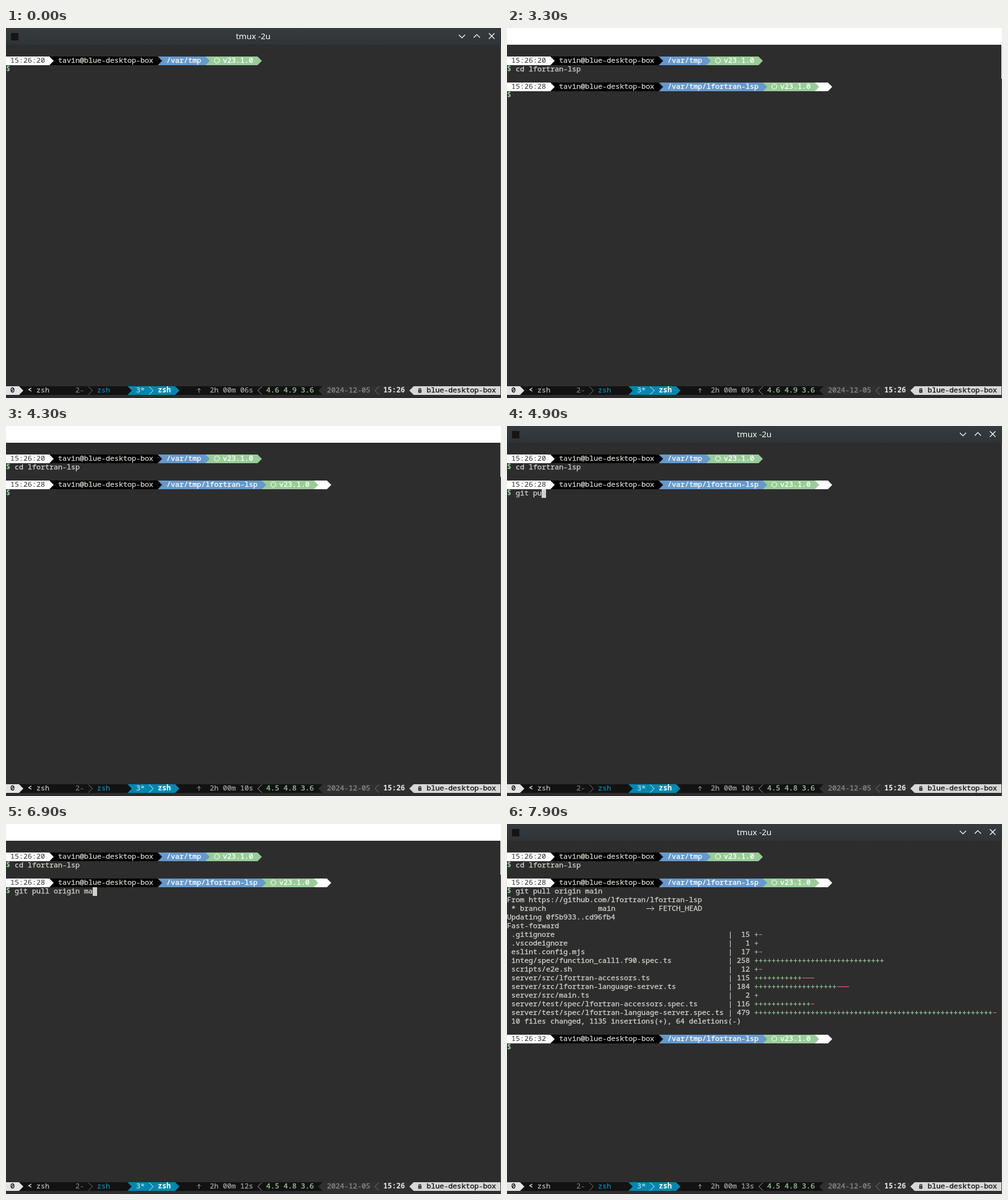
These frames come from a looping animation (799x597 px, 8 s). An HTML page:

```html
<!DOCTYPE html>
<html lang="en">
<head>
<meta charset="utf-8">
<title>Terminal</title>
<style>
html, body { margin: 0; width: 100%; height: 100%; overflow: hidden; background: #2d2d2d; }
svg { display: block; width: 799px; height: 597px; }
text { font: 400 11.667px "Noto Sans Mono", "DejaVu Sans Mono", monospace; white-space: pre; font-variant-ligatures: none; stroke-width: .3px; }
.b { font-weight: 600; stroke: none; }
.n { stroke: none; }
.title { font: 400 13.33px "Noto Sans", sans-serif; }
</style>
</head>
<body>
<svg id="stage" viewBox="0 0 799 597"></svg>
<script>
const LOOP = 8000, CW = 7, CH = 14;
const FG = '#d3d0c8', BG = '#2d2d2d', GREEN = '#99cc99', BLUE = '#6699cc', RED = '#f2676a';
const HOST = 'blue-desktop-box', USER = 'tavin';

const esc = s => s.replace(/&/g, '&amp;').replace(/</g, '&lt;').replace(/>/g, '&gt;');
// A hairline stroke gives the text its medium weight.
const text = (x, top, s, fill = FG, cls = '', id = '') =>
  `<text x="${x}" y="${top + 10}" fill="${fill}" stroke="${fill}" class="${cls}" id="${id}">${esc(s)}</text>`;
const rect = (x, y, w, h, fill) =>
  `<rect x="${x}" y="${y}" width="${w}" height="${h}" fill="${fill}"/>`;
const line = (d, color, w = 1) =>
  `<path d="${d}" fill="none" stroke="${color}" stroke-width="${w}"/>`;
const tip = (x, top, fill) => `<path d="M${x} ${top}l7 7l-7 7z" fill="${fill}"/>`;
const tipLeft = (x, top, fill) => `<path d="M${x + 7} ${top}l-7 7l7 7z" fill="${fill}"/>`;
const chevron = (x, top, color) => line(`M${x} ${top + .5}l6.5 6.5l-6.5 6.5`, color);
const chevronLeft = (x, top, color) => line(`M${x + 7} ${top + .5}l-6.5 6.5l6.5 6.5`, color);
const group = (id, body) => `<g id="${id}">${body}</g>`;

// Segmented prompt; each segment runs under the tip of the one before it.
function prompt(top, clock, path, inRepo) {
  const a = 259 + path.length * CW + CW, b = a + 84;
  const hx = a + 18.5, hy = top + 6.5;
  let s = inRepo ? rect(b, top, 21, CH, '#fff') + tip(b + 21, top, '#fff') : '';
  s += rect(a, top, 84, CH, GREEN) + tip(b, top, GREEN);
  s += rect(245, top, a - 245, CH, BLUE) + tip(a, top, BLUE);
  s += rect(70, top, 175, CH, '#000') + tip(245, top, '#000');
  s += rect(0, top, 70, CH, '#fff') + tip(70, top, '#fff');
  s += text(7, top, clock, '#2d2d2d', 'n');
  s += text(84, top, `${USER}@${HOST}`, FG);
  s += text(259, top, path, '#fff');
  s += line(`M${hx} ${hy - 4.3}l3.8 2.1v4.4l-3.8 2.1l-3.8 -2.1v-4.4z`, '#fff');
  s += text(a + 28, top, 'v23.1.0', '#fff');
  return s + text(0, top + CH, '$', GREEN, 'b');
}

// name, changed lines, plus signs, minus signs
const files = [
  ['.gitignore', 15, 1, 1],
  ['.vscodeignore', 1, 1, 0],
  ['eslint.config.mjs', 17, 1, 1],
  ['integ/spec/function_call1.f90.spec.ts', 258, 30, 0],
  ['scripts/e2e.sh', 12, 1, 1],
  ['server/src/lfortran-accessors.ts', 115, 11, 3],
  ['server/src/lfortran-language-server.ts', 184, 19, 3],
  ['server/src/main.ts', 2, 1, 0],
  ['server/test/spec/lfortran-accessors.spec.ts', 116, 13, 1],
  ['server/test/spec/lfortran-language-server.spec.ts', 479, 55, 1]
];

function pullOutput() {
  let s = text(0, 116, 'From https://github.com/lfortran/lfortran-lsp');
  s += text(7, 130, '* branch') + text(147, 130, 'main') + text(245, 130, 'FETCH_HEAD');
  s += line('M225 136.5h12M233.5 133l3.5 3.5l-3.5 3.5', FG);
  s += text(0, 144, 'Updating 0f5b933..cd96fb4') + text(0, 158, 'Fast-forward');
  files.forEach(([name, n, plus, minus], i) => {
    const top = 172 + i * CH, x = 399 + plus * CW;
    s += text(7, top, name) + text(357, top, '| ' + String(n).padStart(3));
    s += text(399, top, '+'.repeat(plus), GREEN);
    if (minus) s += line(`M${x + 1} ${top + 6.5}h${minus * CW - 2}`, RED);
  });
  return s + text(7, 312, '10 files changed, 1135 insertions(+), 64 deletions(-)');
}

function titleBar() {
  return rect(0, 0, 799, 27, 'url(#bar)') + rect(8, 8, 12, 12, '#171413') +
    '<text x="399" y="18" text-anchor="middle" fill="#fcfcfc" class="title">tmux -2u</text>' +
    line('M731 11l5 5l5 -5M755 15.5l5 -5l5 5M779.5 8.5l9 9M788.5 8.5l-9 9', '#fcfcfc', 1.2);
}

function statusBar() {
  const y = 578, dark = '#121212', teal = '#0087af', mid = '#303030', pale = '#d7d7d7', grey = '#9e9e9e';
  const light = '#e4e4e4';
  let s = rect(0, y, 511, CH, dark) + rect(511, y, 140, CH, mid);
  s += rect(0, y, 21, CH, light) + tip(21, y, light) + text(7, y, '0', dark);
  s += text(35, y, '<', light, 'b') + text(49, y, 'zsh', '#b2b2b2');
  s += text(112, y, '2-', '#767676') + chevron(133, y, '#767676') + text(147, y, 'zsh', teal);
  s += rect(196, y, 77, CH, teal) + tip(196, y, dark) + tip(273, y, teal);
  s += text(210, y, '3*', '#afd7e4') + chevron(231, y, '#d7eef5') + text(245, y, 'zsh', '#fff', 'b');
  s += line('M311.5 588.5v-7M308.5 584.5l3 -3l3 3', grey);
  s += text(329, y, '', grey, '', 'uptime') + chevronLeft(406, y, grey);
  s += text(420, y, '', GREEN, '', 'load');
  s += tipLeft(504, y, mid) + text(518, y, '2024-12-05', '#8a8a8a') + chevronLeft(595, y, '#767676');
  s += text(609, y, '15:26', light, 'b');
  s += tipLeft(651, y, pale) + rect(658, y, 140, CH, pale);
  s += rect(665.5, 583.5, 5, 5, '#222') + line('M666.5 584v-2.5h3v2.5', '#222') + rect(667.5, 585, 1, 2, pale);
  return s + text(679, y, HOST, dark);
}

const $ = id => document.getElementById(id);
$('stage').innerHTML =
  '<defs><linearGradient id="bar" x2="0" y2="1"><stop stop-color="#353c40"/><stop offset="1" stop-color="#2e3438"/></linearGradient></defs>' +
  rect(0, 0, 799, 597, BG) + rect(798, 27, 1, 570, '#4a4d4f') + titleBar() +
  prompt(46, '15:26:20', '/var/tmp', false) + text(14, 60, '', FG, '', 'cmd1') +
  group('second', prompt(88, '15:26:28', '/var/tmp/lfortran-lsp', true) + text(14, 102, '', FG, '', 'cmd2')) +
  group('third', pullOutput() + prompt(340, '15:26:32', '/var/tmp/lfortran-lsp', true)) +
  statusBar() +
  `<rect id="cursor" width="${CW}" height="${CH}" fill="${FG}"/>` +
  group('flash', rect(0, 0, 799, 27, '#fff') + rect(798, 27, 1, 55, '#fff'));

// Keystrokes and their times; "<" is a backspace.
const cd = {
  keys: 'cd lfortran-lfs<<sp',
  at: [100, 300, 400, 500, 600, 700, 800, 1000, 1100, 1200, 1300, 1500, 1700, 1800, 1900, 2200, 2300, 2400, 2600]
};
const pull = {
  keys: 'git pull origin main',
  at: [4400, 4500, 4600, 4700, 4800, 4900, 5000, 5100, 5200, 5400, 5400, 5500, 5500, 5600, 6400, 6700, 6800, 6900, 7000, 7100]
};
const ENTER1 = 2800, READY1 = 2900, ENTER2 = 7400, READY2 = 7500;
const presses = [-500, ...cd.at, ENTER1, ...pull.at, ENTER2];
const flashes = [3300, 3800, 4300, 6100, 6900, 7300];
const ticks = [[0, 6], [2000, 8], [3000, 9], [4000, 10], [6000, 12], [7700, 13]];

function typed({ keys, at }, t) {
  let s = '';
  at.forEach((time, i) => {
    if (time <= t) s = keys[i] === '<' ? s.slice(0, -1) : s + keys[i];
  });
  return s;
}

const show = (id, on) => $(id).setAttribute('visibility', on ? 'visible' : 'hidden');

function render(t) {
  const a = typed(cd, t), b = typed(pull, t);
  $('cmd1').textContent = a;
  $('cmd2').textContent = b;
  show('second', t >= READY1);
  show('third', t >= READY2);

  let x = 14 + a.length * CW, y = 60;
  if (t >= READY2) [x, y] = [14, 354];
  else if (t >= ENTER2) [x, y] = [0, 116];
  else if (t >= READY1) [x, y] = [14 + b.length * CW, 102];
  else if (t >= ENTER1) [x, y] = [0, 74];
  $('cursor').setAttribute('x', x);
  $('cursor').setAttribute('y', y);
  const last = presses.filter(p => p <= t).pop();
  show('cursor', Math.floor((t - last) / 500) % 2 === 0);

  const sec = ticks.filter(k => k[0] <= t).pop()[1];
  $('uptime').textContent = `2h 00m ${String(sec).padStart(2, '0')}s`;
  $('load').textContent = t < 4000 ? '4.6 4.9 3.6' : '4.5 4.8 3.6';
  show('flash', flashes.some(f => t >= f && t < f + 100));
}

function frame() {
  render(performance.now() % LOOP);
  requestAnimationFrame(frame);
}
frame();
</script>
</body>
</html>
```
